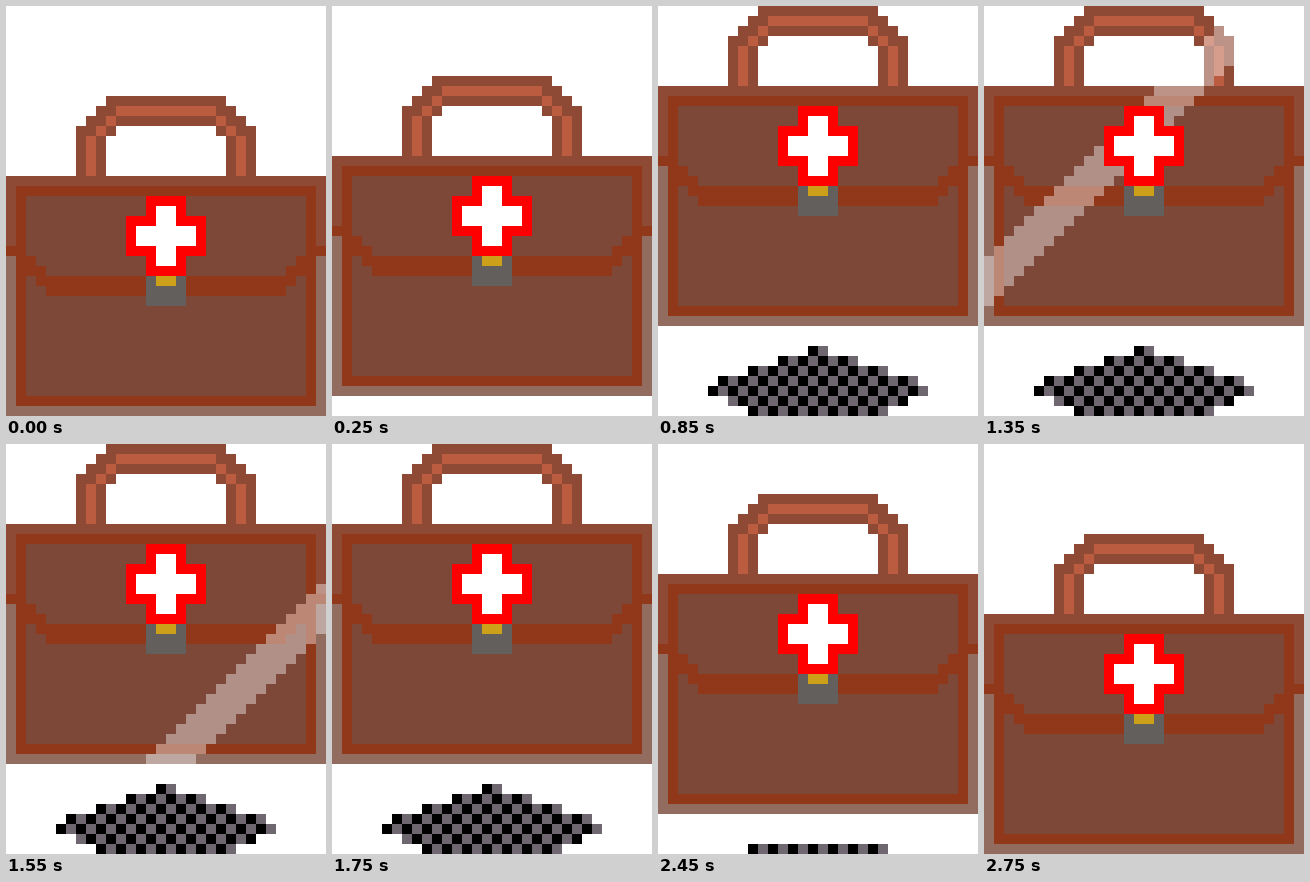
Animation, 320 px wide and 410 px high, one loop 3150 ms. Source, as an HTML page:

```html
<!DOCTYPE html>
<html lang="en">
<head>
<meta charset="utf-8">
<title>Medical bag</title>
<style>
  html, body { margin: 0; width: 100%; height: 100%; overflow: hidden; background: #fff; }
  svg { display: block; width: 320px; height: 410px; }
</style>
</head>
<body>
<svg viewBox="0 0 32 41" shape-rendering="crispEdges">
  <g id="shadow">
    <path id="shadowGray" fill="#6f676f"/>
    <path id="shadowBlack" fill="#000"/>
  </g>
  <g id="bag"></g>
  <path id="shine" fill="#fff" fill-opacity=".4"/>
  <g id="badge"></g>
</svg>
<script>
const LOOP = 3150, STEP = 150, RISE = 250, FALL = 2150;
const SHINE_START = 1150, SHINE_STEP = 50, SHINE_WIDTH = 5;
const BAG_HEIGHT = 32, GROUND = 41, CENTER = 16;

// Half widths of the shadow rows for each lift level, ending at the ground.
const SHADOWS = [[], [], [7], [5, 7, 7], [4, 6, 9, 8, 7], [1, 4, 7, 10, 11, 9, 7]];

const color = {
  strap: '#8f4a35', strapLight: '#bb5b40', rim: '#8f4a35', side: '#936c60',
  leather: '#7d4837', seam: '#91371a', red: '#f00', white: '#fff',
  clasp: '#635f5c', gold: '#cda01a'
};

const byId = id => document.getElementById(id);
const cells = (x, y, w = 1, h = 1) => `M${x} ${y}h${w}v${h}h${-w}z`;
const both = (x, y, w = 1, h = 1) => cells(x, y, w, h) + cells(32 - x - w, y, w, h);
const clamp = (v, lo, hi) => Math.min(hi, Math.max(lo, v));

function paint(group, fill, ...parts) {
  const path = document.createElementNS('http://www.w3.org/2000/svg', 'path');
  path.setAttribute('fill', fill);
  path.setAttribute('d', parts.join(''));
  group.append(path);
}

function buildBag() {
  const bag = byId('bag');
  // Handle
  paint(bag, color.strap, cells(10, 0, 12), cells(9, 1, 14), cells(8, 2, 16),
    both(7, 3, 4), both(7, 4, 3, 4));
  paint(bag, color.strapLight, cells(11, 1, 10), both(10, 2), both(9, 3), both(8, 4, 1, 4));
  // Body
  paint(bag, color.side, cells(0, 8, 32, 24));
  paint(bag, color.rim, cells(0, 8, 32, 7));
  paint(bag, color.seam, cells(1, 9, 30, 22));
  paint(bag, color.leather, cells(2, 10, 28, 20));
  // Flap edge
  paint(bag, color.seam, both(0, 15), both(2, 16), both(2, 17, 2),
    cells(3, 18, 26), cells(4, 19, 24));
}

function buildBadge() {
  const badge = byId('badge');
  paint(badge, color.clasp, cells(14, 18, 4, 3));
  paint(badge, color.gold, cells(15, 18, 2));
  paint(badge, color.red, cells(14, 10, 4, 8), cells(12, 12, 8, 4));
  paint(badge, color.white, cells(15, 11, 2, 6), cells(13, 13, 6, 2));
}

function shadowPaths(level) {
  const rows = SHADOWS[level];
  let gray = '', black = '';
  rows.forEach((half, i) => {
    const y = GROUND - rows.length + i;
    gray += cells(CENTER - half, y, half * 2);
    for (let x = CENTER - half; x < CENTER + half; x++) {
      if ((x + y) % 2) black += cells(x, y);
    }
  });
  return [gray, black];
}

function shinePath(t) {
  const step = Math.floor((t - SHINE_START) / SHINE_STEP);
  if (step < 0 || step > 11) return '';
  const start = 5 + step * 5;
  let d = '';
  for (let y = 0; y < BAG_HEIGHT; y++) {
    const left = clamp(start - y, 0, 32);
    const right = clamp(start - y + SHINE_WIDTH, 0, 32);
    if (right > left) d += cells(left, y, right - left);
  }
  return d;
}

const stepsSince = (t, start) => clamp(Math.floor((t - start) / STEP) + 1, 0, 5);

function render(t) {
  const level = stepsSince(t, RISE) - stepsSince(t, FALL);
  const move = `translate(0 ${Math.max(0, 9 - 2 * level)})`;
  byId('bag').setAttribute('transform', move);
  byId('badge').setAttribute('transform', move);
  const [gray, black] = shadowPaths(level);
  byId('shadowGray').setAttribute('d', gray);
  byId('shadowBlack').setAttribute('d', black);
  byId('shine').setAttribute('d', shinePath(t));
}

buildBag();
buildBadge();
render(0);

let origin;
function tick(now) {
  origin ??= now;
  render((now - origin) % LOOP);
  requestAnimationFrame(tick);
}
requestAnimationFrame(tick);
</script>
</body>
</html>
```
